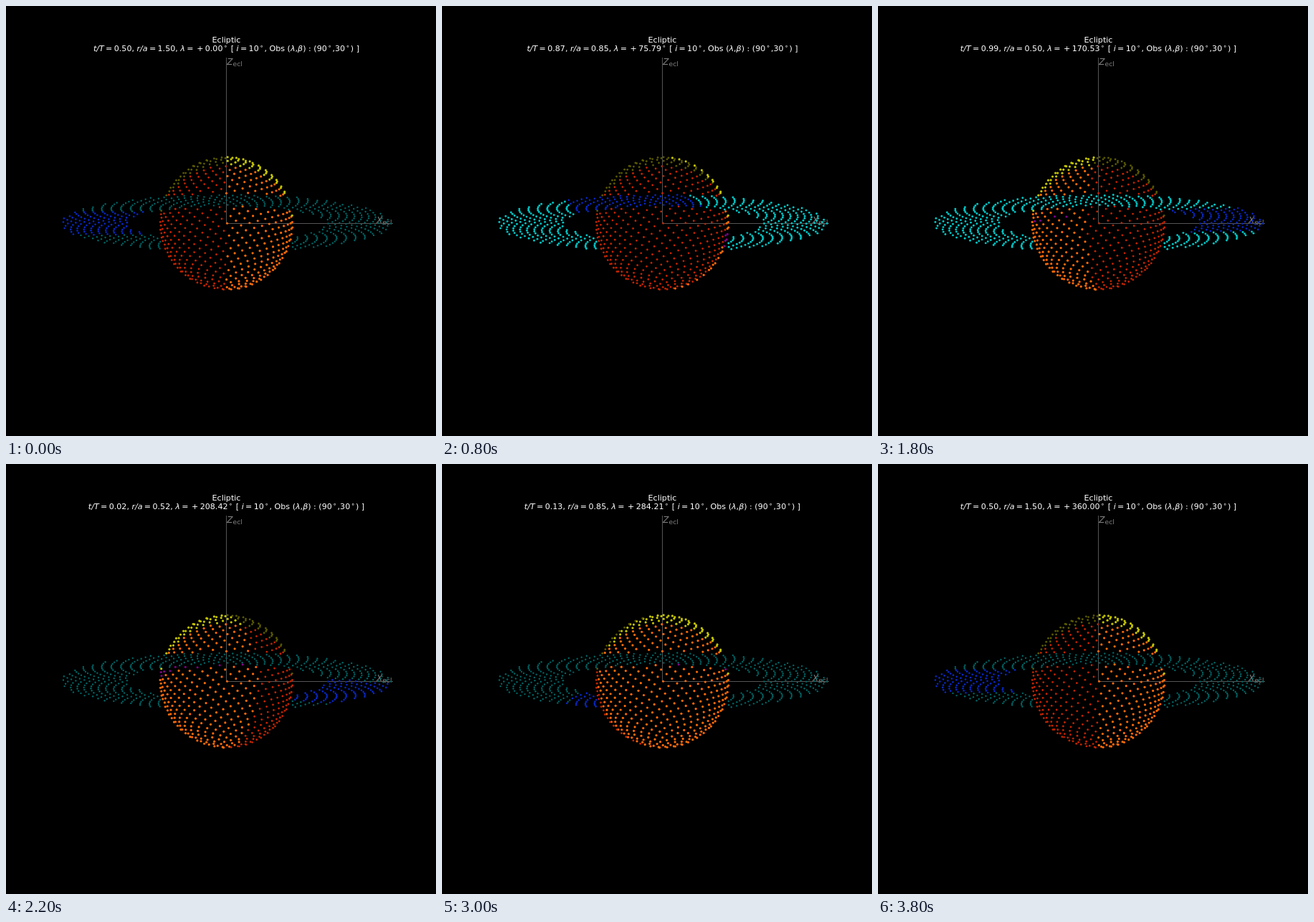
These frames come from a looping animation (600x600 px, 4 s). An HTML page with a canvas:

```html
<!DOCTYPE html>
<html lang="en">
<head>
<meta charset="utf-8">
<title>Ecliptic</title>
<style>
html, body { margin: 0; width: 100%; height: 100%; overflow: hidden; background: #000; }
canvas { display: block; width: 600px; height: 600px; }
</style>
</head>
<body>
<canvas id="stage" width="600" height="600"></canvas>
<script>
const ctx = document.getElementById('stage').getContext('2d');
const CX = 307.5, CY = 303.3, R = 92.5;
const INNER = 1.5, OUTER = 2.5, ECC = 0.5;
const STEPS = 20, HOLD = 200;
const DEG = Math.PI / 180;
const GOLDEN = Math.PI * (3 - Math.sqrt(5));
const FONT = '"DejaVu Sans", sans-serif';
const SIZE = 11.11;

const sinI = Math.sin(10 * DEG), cosI = Math.cos(10 * DEG);
const pole = [0, sinI, cosI];
const viewer = [0, -1, 0];
const observer = [0, Math.cos(30 * DEG), Math.sin(30 * DEG)];

const dot = (a, b) => a[0] * b[0] + a[1] * b[1] + a[2] * b[2];
const along = (p, d, t) => p.map((v, i) => v + d[i] * t);
const norm = p => Math.hypot(...p);

// equatorial cylinder coordinates to ecliptic ones
function place(r, angle, z) {
  const x = r * Math.cos(angle), y = r * Math.sin(angle);
  return [x, y * cosI + z * sinI, z * cosI - y * sinI];
}

// does the ray from p along d cross the ring?
function hitsRing(p, d) {
  const slope = dot(pole, d);
  if (Math.abs(slope) < 1e-9) return false;
  const t = -dot(pole, p) / slope;
  if (t <= 0) return false;
  const r = norm(along(p, d, t));
  return r >= INNER && r <= OUTER;
}

// does the planet block the ray from p along d?
function behindPlanet(p, d) {
  const t = dot(p, d);
  return t < 0 && norm(along(p, d, -t)) < 1;
}

// sunflower spirals: the globe from its south pole up, the ring outwards
const COUNT = 1000;
const globe = [], ring = [];
for (let i = 0; i < COUNT; i++) {
  const z = (2 * i + 1) / COUNT - 1;
  const p = place(Math.sqrt(1 - z * z), i * GOLDEN, z);
  if (dot(p, viewer) > 0 && !hitsRing(p, viewer)) globe.push(p);
  const r = OUTER * Math.sqrt(i / COUNT);
  const q = place(r, i * GOLDEN, 0);
  if (r >= INNER && !behindPlanet(q, viewer)) ring.push(q);
}

function plot(p, color, radius) {
  ctx.fillStyle = color;
  ctx.beginPath();
  ctx.arc(CX + p[0] * R, CY - p[2] * R, radius, 0, 2 * Math.PI);
  ctx.fill();
}

function drawGlobe(sun) {
  for (const p of globe) {
    const seen = dot(p, observer) > 0;
    if (dot(p, sun) <= 0) plot(p, seen ? '#5a5a00' : '#c42400', 1.4);
    else if (hitsRing(p, sun)) plot(p, '#86008a', 1.5);
    else plot(p, seen ? '#c4c400' : '#ff6a08', 1.6);
  }
}

function drawRing(sun) {
  const lit = dot(pole, sun) * dot(pole, observer) > 1e-9;
  for (const p of ring) {
    if (behindPlanet(p, sun)) plot(p, '#0828c4', 1.3);
    else if (lit) plot(p, '#00c6c6', 1.45);
    else plot(p, '#006464', 1.2);
  }
}

function label(main, x, y) {
  ctx.fillStyle = '#808080';
  ctx.font = `italic 12px ${FONT}`;
  ctx.fillText(main, x, y);
  const w = ctx.measureText(main).width;
  ctx.font = `9.2px ${FONT}`;
  ctx.fillText('ecl', x + w, y + 1.5);
}

function drawAxes() {
  ctx.fillStyle = '#555';
  ctx.fillRect(307, 72, 1, 231.5);
  ctx.fillRect(307, 303, 233, 1);
  label('Z', 308.3, 82);
  label('X', 517, 303);
}

// lays out the heading; returns its width and paints it when asked
function heading(parts, x, paint) {
  const start = x;
  for (const s of parts) {
    const degree = s === '∘', italic = /^([a-z]|[a-z]\/[a-zA-Z]|[λβ])$/.test(s);
    const gap = s === '=' || s === '+' ? 2.3 : degree ? 1.2 : 0;
    ctx.font = `${italic ? 'italic ' : ''}${degree ? 8.5 : SIZE}px ${FONT}`;
    if (paint) ctx.fillText(s, x + gap, degree ? 59.2 : 63);
    x += ctx.measureText(s).width + 2 * gap;
  }
  return x - start;
}

function drawTitle(lon) {
  const nu = (lon + 180) * DEG;
  const dist = (1 - ECC * ECC) / (1 + ECC * Math.cos(nu));
  const E = 2 * Math.atan2(Math.sqrt(1 - ECC) * Math.sin(nu / 2),
                           Math.sqrt(1 + ECC) * Math.cos(nu / 2));
  const turn = (E - ECC * Math.sin(E)) / (2 * Math.PI);
  const phase = ((turn % 1) + 1) % 1;
  const parts = ['t/T', '=', phase.toFixed(2) + ', ', 'r/a', '=', dist.toFixed(2) + ', ',
    'λ', '=', '+', lon.toFixed(2), '∘', ' [ ', 'i', '=', '10', '∘', ', Obs (',
    'λ', ',', 'β', ') : (90', '∘', ',30', '∘', ') ]'];
  ctx.fillStyle = '#fff';
  ctx.font = `${SIZE}px ${FONT}`;
  ctx.fillText('Ecliptic', CX - ctx.measureText('Ecliptic').width / 2, 50.5);
  heading(parts, CX - heading(parts, 0, false) / 2, true);
}

function draw(step) {
  const lon = step * 360 / (STEPS - 1);
  const sun = [Math.cos(lon * DEG), Math.sin(lon * DEG), 0];
  ctx.fillStyle = '#000';
  ctx.fillRect(0, 0, 600, 600);
  drawAxes();
  drawGlobe(sun);
  drawRing(sun);
  drawTitle(lon);
}

let shown = -1;
const begin = performance.now();
function tick() {
  const step = Math.floor((performance.now() - begin) / HOLD) % STEPS;
  if (step !== shown) draw(shown = step);
  requestAnimationFrame(tick);
}
tick();
</script>
</body>
</html>
```
